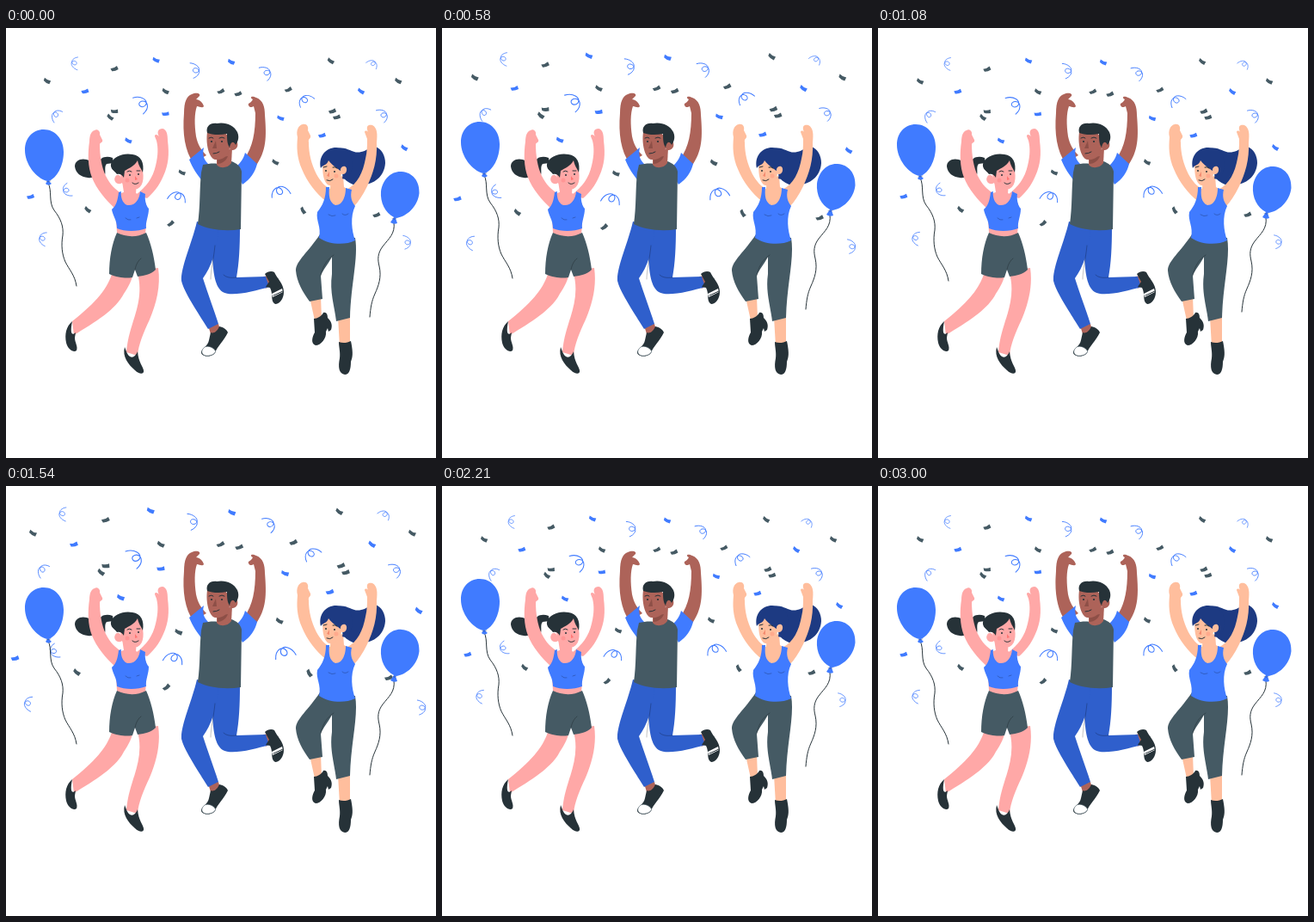
These frames come from a looping animation (500x500 px, 3.04 s). An HTML page:

```html
<!DOCTYPE html>
<html lang="en">
<head>
<meta charset="utf-8">
<title>Celebration</title>
<style>
html, body { margin: 0; width: 100%; height: 100%; overflow: hidden; background: #fff; }
svg { display: block; width: 100vw; height: 100vh; }
.blue { fill: #407bff; }
.denim { fill: #2f5fcc; }
.navy { fill: #1d3a82; }
.ink { fill: #263238; }
.slate { fill: #455a64; }
.rose { fill: #ffa8a7; }
.brown { fill: #ad6359; }
.peach { fill: #ffbe9d; }
.white { fill: #fff; }
.line { fill: none; stroke: #263238; stroke-width: 1; stroke-linecap: round; stroke-linejoin: round; }
.curl { fill: none; stroke: #407bff; stroke-linecap: round; }
.crease { fill: none; stroke: #000; stroke-opacity: .3; stroke-width: .8; stroke-linecap: round; }
</style>
</head>
<body>
<svg viewBox="0 0 500 500" xmlns="http://www.w3.org/2000/svg">
<g id="confetti"></g>

<g class="balloon">
  <path class="line" stroke-width="1.2" d="M49 180C54 190 49 202 56 212C64 222 67 231 66 241C64 252 65 263 69 272C74 282 80 287 82 300"/>
  <path class="blue" d="M44 118C57 118 67 129 67 144C67 161 59 174 50 178L53 181Q49 184 46 181L48 178C35 175 22 158 22 142C22 128 31 118 44 118Z"/>
  <path class="crease" d="M47 178.5Q50 179.5 52 178"/>
</g>
<g class="balloon">
  <path class="line" stroke-width="1.2" d="M451 226C453 239 445 245 438 254C432 262 432 269 434 277C437 290 433 300 429 309C425 318 424 325 423 336"/>
  <path class="blue" d="M460 167C473 168 481 178 480.500 192C479 207 466 220 453 221L455 227Q451 229 447 226L451 220C441 215 435 203 436 190C438 175 449 166 460 167Z"/>
  <path class="crease" d="M449 221.500Q452 223 454 221.500"/>
</g>

<g id="ponytail-dancer">
  <path class="ink" d="M124 151C116 148 108 151 109 157C107 165 104 161 98 155C90 150 80 153 80 161C81 169 87 173 95 174C101 175 105 172 110 166C109 171 111 175 113 173C118 171 113 162 117 158L125 157Z"/>
  <path class="rose" d="M97 132C97 125 99 120 103 119C106 117 110 120 109 124L112 130C113 133 110 133 109 135C109 148 111 161 116 172C121 182 127 188 134 192L128 211C116 200 105 187 100 174C95 161 95 146 97 132Z"/>
  <path class="rose" d="M175 131L173 126C173 123 176 124 178 126C175 121 177 117 182 117C187 118 188 124 188 131C190 147 189 159 183 172C178 184 171 192 164 198L151 194C163 185 171 174 174 160C177 148 177 139 175 131Z"/>
  <path class="rose" d="M124 283C119 302 105 319 77 341L79 357C104 342 128 327 137 309C143 300 147 292 148 284Z"/>
  <path class="rose" d="M152 282C159 304 154 323 147 344C142 360 141 367 140 377L153 381C154 368 160 354 167 339C175 320 180 300 177 279Z"/>
  <path class="ink" d="M77 341C70 347 68 356 70 366C72 374 79 378 82 375C84 370 80 366 80 360L81 354C77 358 74 356 77 341Z"/>
  <path class="ink" d="M138 371C135 382 142 391 150 398C155 403 161 403 160 398C159 393 154 389 153 376C151 381 148 384 144 382C141 380 140 376 138 371Z"/>
  <path class="rose" d="M135 178L152 181L151 192C160 195 165 205 164 215L162 240C153 244 137 244 129 238L127 205C128 197 132 192 137 191Z"/>
  <path class="blue" d="M134 190C133 195 135 204 141 206C150 207 155 200 156 190L162 193C161 200 163 207 166 210C166 219 162 225 163 233C153 237 138 237 129 233C129 223 124 218 123 211C128 207 130 200 131 191Z"/>
  <path class="slate" d="M129 238C123 251 120 268 120 286C131 291 141 291 147 290L150 281L153 289C162 288 169 286 174 281C172 264 168 249 163 238C152 244 139 243 129 238Z"/>
  <path class="crease" d="M150 281C151 275 154 270 157 268M139 221Q142 224 145 223M152 221L155 220"/>
  <path class="rose" d="M131 163C133 150 150 147 157 158C161 170 161 183 153 187C145 189 137 184 135 180C130 184 124 178 127 173C129 169 133 171 134 174Z"/>
  <path class="ink" d="M122 158C125 149 137 145 147 147C157 148 161 157 159 168C157 163 154 160 153 154C149 161 143 163 138 166L137 174C135 171 133 169 129 170C126 166 121 164 122 158Z"/>
  <circle class="ink" cx="144" cy="171" r="1"/><circle class="ink" cx="154" cy="170" r="1"/>
  <path class="line" d="M141 167Q143 165 146 167M152 166L156 166M147 180Q150 183 154 180" stroke-width=".8"/>
  <path fill="#ff7775" d="M150 172L153 176L150 177Z"/>
  <circle cx="141" cy="177" r="2.500" fill="#ff8b8a" opacity=".6"/>
</g>

<g id="center-dancer">
  <path class="brown" d="M207 99C207 86 210 79 216 77C222 74 228 77 224 80L221 83C225 83 229 87 230 91C228 94 225 91 222 91C219 99 219 112 221 126C223 136 227 142 233 148L218 157C208 143 205 123 207 99Z"/>
  <path class="brown" d="M290 99L288 91C284 94 281 90 282 88C284 87 286 85 287 83C283 81 285 78 291 81C299 84 301 92 301 101C303 127 303 143 290 161L277 152C287 139 290 121 290 99Z"/>
  <path class="blue" d="M230 139L213 153C217 163 222 170 229 179L235 158C230 153 228 147 230 139Z"/>
  <path class="blue" d="M278 145L292 158C290 167 284 176 275 182L265 163C271 159 276 153 278 145Z"/>
  <path class="brown" d="M299 289L306 288L308 298L302 303ZM235 346L247 344L250 355L239 359Z"/>
  <path class="denim" d="M239 229L272 232C272 255 271 274 268 290L302 289L306 301C289 306 262 313 252 307C243 301 241 285 240 265Z"/>
  <path class="denim" d="M222 225L247 232C246 258 238 279 229 291C235 310 242 328 247 344L235 350C222 329 207 307 204 294C203 278 216 251 222 225Z"/>
  <path class="crease" d="M243 253C241 272 238 282 238 292M268 290C261 291 256 290 253 287"/>
  <path class="ink" d="M301 286C304 283 309 282 312 284C315 291 323 297 323 307C323 315 318 321 313 321C307 318 311 309 307 302L302 301L306 295Z"/>
  <path class="white" d="M309 309L321 303L322 307L310 313Z"/>
  <path class="line" d="M311 311L322 306M311 295L316 292M312 299L318 296" stroke="#fff"/>
  <path class="ink" d="M238 354C242 356 246 352 248 347C253 348 257 351 258 354C254 363 245 371 243 378C239 383 229 383 227 378C226 374 235 370 236 363Z"/>
  <path class="white" stroke="#455a64" stroke-width=".6" d="M231 371C235 369 241 371 244 376C241 382 230 383 228 378C227 375 229 373 231 371Z"/>
  <path class="slate" d="M229 159C235 158 241 157 246 158L262 155C268 157 273 161 274 167L273 234C254 237 234 234 223 228C226 209 225 184 227 168Z"/>
  <path class="brown" d="M245 146L263 140L262 157C258 163 249 164 245 159Z"/>
  <path d="M246 151L258 149C256 155 250 158 246 158Z" fill="#8d4f47"/>
  <path class="brown" d="M234 121C238 114 256 117 262 132C265 127 271 132 269 138C267 143 261 143 260 140C258 149 252 154 243 153C236 151 232 135 234 121Z"/>
  <path class="ink" d="M234 122C232 115 237 110 245 111C255 109 265 113 269 121C272 128 269 133 267 136C264 130 261 133 260 139C257 135 257 128 257 123C248 125 239 124 234 122Z"/>
  <circle class="ink" cx="239" cy="132" r="1.100"/><circle class="ink" cx="251" cy="132" r="1.100"/>
  <path class="line" d="M236 128Q239 126 241 128M248 128Q251 126 254 128M241 146Q245 146 248 144"/>
  <path d="M244 131L240 140L245 140Z" fill="#8d4f47"/>
</g>

<g id="long-hair-dancer">
  <path class="navy" d="M386 140C397 137 403 147 413 144C420 143 423 137 429 138C437 140 441 149 441 157C440 174 426 183 412 182C404 184 398 180 392 174Z"/>
  <path class="peach" d="M339 127C337 119 340 113 345 112C350 111 352 115 351 119L354 125C355 129 351 128 352 133C352 146 355 158 361 170C366 179 371 184 378 188L373 202C361 193 350 179 344 164C338 150 338 139 339 127Z"/>
  <path class="peach" d="M420 129L417 121C417 119 420 119 421 121C418 114 421 112 426 113C432 116 432 124 431 133C432 153 427 169 420 184C415 194 410 202 404 208L396 188C409 181 415 168 418 152C420 144 420 136 420 129Z"/>
  <path class="peach" d="M353 313L366 312L367 338L359 340ZM386 336L400 334L400 368L388 370Z"/>
  <path class="slate" d="M365 240L385 252C380 269 370 278 366 288L368 315L353 318C345 307 338 295 337 282C337 271 352 260 365 240Z"/>
  <path class="slate" d="M370 240L406 244C410 267 401 298 400 337L384 341C382 323 376 307 379 286L379 263Z"/>
  <path class="crease" d="M381 264C372 270 368 278 366 288"/>
  <path class="ink" d="M358 338C362 338 367 335 369 331C373 330 374 334 374 337C378 341 380 345 378 351L375 353L374 349L372 353C373 361 366 369 360 369C354 367 356 359 359 354Z"/>
  <path class="ink" d="M387 365C392 367 397 366 401 364C403 374 404 381 401 388C401 397 399 403 394 403C387 402 386 394 388 384C389 377 387 371 387 365Z"/>
  <path class="peach" d="M378 175L392 172L393 185L402 190L397 202L382 207L372 200L377 186Z"/>
  <path class="blue" d="M376 185C375 195 376 203 383 206C392 206 395 195 395 186L402 188C400 196 402 202 406 207C400 219 402 236 406 247C394 253 376 252 364 244C367 231 360 224 362 214C368 207 372 198 372 185Z"/>
  <path class="crease" d="M375 217Q379 220 383 218M391 216Q394 219 398 216"/>
  <path class="peach" d="M369 154C375 147 387 151 390 162C392 158 398 160 397 165C396 170 392 171 390 169C389 179 383 185 376 183C369 181 367 166 369 154Z"/>
  <path class="navy" d="M366 163C363 149 372 139 384 139C398 139 406 151 402 165C400 174 395 177 391 175L392 169C388 164 381 162 375 154C373 160 368 159 366 163Z"/>
  <path class="peach" d="M389 164C391 159 397 160 396 166C395 171 390 171 389 168Z"/>
  <circle class="ink" cx="372" cy="166" r="1"/><circle class="ink" cx="382" cy="167" r="1"/>
  <path class="line" d="M369 162L373 161M380 162Q383 161 385 163M373 177Q377 179 380 176" stroke-width=".8"/>
  <path fill="#f38b70" d="M376 167L373 172L376 173Z"/>
  <circle cx="384" cy="172" r="2.500" fill="#ff9c82" opacity=".6"/>
</g>
</svg>

<script>
const LOOP = 3040, STEP = 1000 / 24, BOB = 1500;
const CENTER = [254, 146];
const FLAKE = "M-4-2.600Q0-.6 4-1.600L3.600 2.600Q-1 2.800-4 .8Z";
const CURL = "M-10 5C-8-4 1-9 4-3C6 4-3 5-2-1C0-8 9-6 11 4";

// x, y, angle
const darkFlakes = [
  [49, 62, 20], [127, 48, -30], [127, 97, -10], [122, 104, 30], [186, 74, 20], [250, 74, -35],
  [270, 77, -30], [328, 72, -35], [377, 39, 25], [455, 62, 20], [379, 97, -30], [384, 104, -25],
  [313, 156, 20], [345, 212, 50], [430, 217, -30], [192, 227, -50], [205, 168, 15], [96, 211, 30]
];
const blueFlakes = [
  [93, 74, -25], [175, 38, 15], [143, 131, 15], [186, 100, -15], [262, 40, 15],
  [319, 105, 10], [367, 125, -25], [412, 74, 25], [30, 196, -25]
];
// x, y, angle, scale (negative mirrors)
const curls = [
  [81, 42, -85, .7], [59, 102, -50, .75], [44, 245, -80, .75], [72, 189, -110, .75],
  [158, 88, 60, 1.050], [199, 196, 15, 1], [220, 49, 80, .85], [302, 52, 60, .85],
  [348, 84, -35, -.9], [319, 190, -15, -1.050], [425, 42, 35, .65], [437, 101, 60, .8], [465, 248, 85, .75]
];

const confetti = document.getElementById("confetti");
const balloons = document.querySelectorAll(".balloon");

function addPiece(shape, className, [x, y, angle, scale = 1]) {
  const piece = document.createElementNS("http://www.w3.org/2000/svg", "path");
  piece.setAttribute("d", shape);
  piece.setAttribute("class", className);
  piece.setAttribute("transform", `translate(${x} ${y}) rotate(${angle}) scale(${scale} ${Math.abs(scale)})`);
  confetti.append(piece);
  return piece;
}

darkFlakes.forEach(p => addPiece(FLAKE, "slate", p));
blueFlakes.forEach(p => addPiece(FLAKE, "blue", p));
curls.forEach(p => addPiece(CURL, "curl", p));
const drifter = addPiece(FLAKE, "blue", [462, 139, 25]);

// Two linear pulses per cycle, from 0 to 1 and back
function burst(ms) {
  if (ms < 300) return ms / 300;
  if (ms < 900) return (900 - ms) / 600;
  if (ms < 1200) return 0;
  if (ms < 1500) return (ms - 1200) / 300;
  return Math.max(0, (1800 - ms) / 300);
}

// cubic-bezier(.42, 0, .58, 1)
function easeInOut(x) {
  let low = 0, high = 1, s = .5;
  for (let i = 0; i < 20; i++) {
    s = (low + high) / 2;
    const at = 3 * (1 - s) * s * (.42 * (1 - s) + .58 * s) + s ** 3;
    if (at < x) low = s; else high = s;
  }
  return s * s * (3 - 2 * s);
}

function render(time) {
  const tick = Math.min(72, Math.floor((time % LOOP + 5) / STEP));
  const ms = Math.max(17, tick * STEP);
  const spread = burst(ms);
  const [cx, cy] = CENTER;
  confetti.setAttribute("transform",
    `translate(${cx} ${cy}) scale(${1 + .1 * spread}) translate(${-cx} ${-cy})`);
  drifter.setAttribute("transform", `translate(462 ${139 + 7 * spread}) rotate(25)`);

  const half = (ms % BOB) / (BOB / 2);
  const lift = 10 * easeInOut(half < 1 ? half : 2 - half);
  balloons.forEach(b => b.setAttribute("transform", `translate(0 ${-lift})`));
}

const start = performance.now();
function frame() {
  render(performance.now() - start);
  requestAnimationFrame(frame);
}
render(0);
requestAnimationFrame(frame);
</script>
</body>
</html>
```
